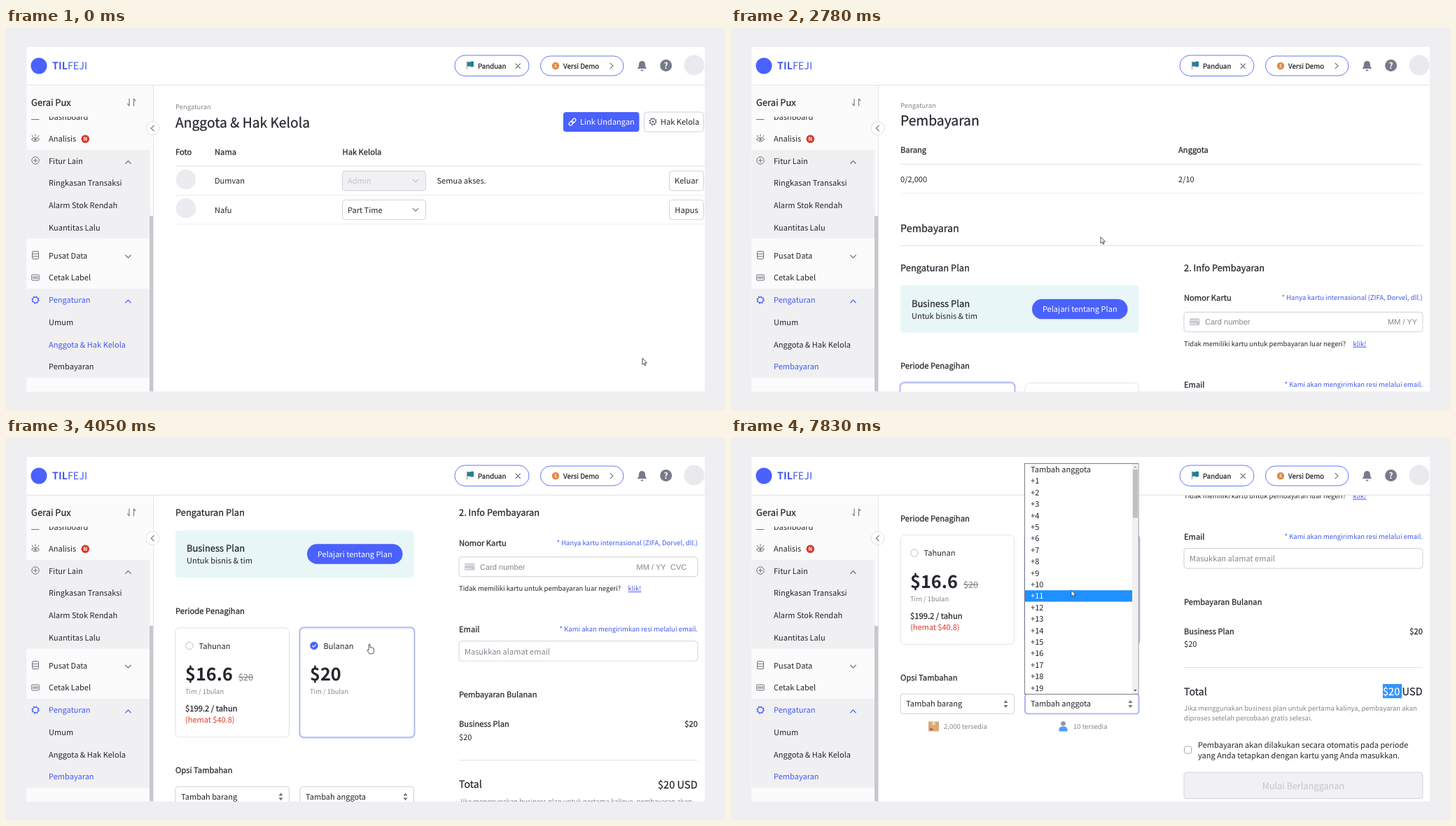
An HTML page for the animation above (8 s loop, 1027 by 545 pixels).

```html
<!DOCTYPE html>
<html lang="id">
<head>
<meta charset="utf-8">
<title>Pengaturan</title>
<style>
html, body { margin: 0; height: 100%; overflow: hidden; background: #efeff2; }
svg { display: block; width: 1027px; height: 545px; }
text {
  font-family: "Noto Sans CJK KR", "Noto Sans CJK JP", "Noto Sans CJK SC", "Noto Sans", sans-serif;
  fill: currentColor; color: #25262e; text-rendering: geometricPrecision; white-space: pre;
}
.m { stroke: currentColor; stroke-width: .25px; }
.bold { font-weight: 700; }
.arial { font-family: "Liberation Sans", Arial, sans-serif; }
.gray { color: #85868f; }
.pale { color: #c3c3ca; }
.blue { color: #4459f0; }
.red { color: #e2382c; }
.white { color: #fff; }
.end { text-anchor: end; }
.mid { text-anchor: middle; }
.under { text-decoration: underline; }
.strike { text-decoration: line-through; }
.line { fill: none; stroke: #70737f; stroke-width: 1.1; stroke-linecap: round; stroke-linejoin: round; }

/* one shared 8 s clock */
.k { animation: 8s step-end infinite; }
.members { animation-name: members; }
.was { animation-name: was; }
.now { animation-name: now; }
.loading { animation-name: loading; }
.bar { animation-name: bar; animation-timing-function: linear; }
.spin { animation-name: spin; animation-timing-function: linear; }
.billing { animation-name: billing; }
.scroll { animation-name: scroll; }
.yearly { animation-name: yearly; }
.monthly { animation-name: monthly; }
.expiry { animation-name: expiry; }
.cvc { animation-name: cvc; }
.picked { animation-name: picked; }
.open { animation-name: open; }
.row { animation-name: row; }
.cursor { animation-name: cursor; animation-timing-function: linear; }
.arrow { animation-name: arrow; }
.hand { animation-name: hand; }

@keyframes members { 0% { opacity: 1 } 19.875%, 100% { opacity: 0 } }
@keyframes was { 0% { color: #4459f0 } 19.875%, 100% { color: #25262e } }
@keyframes now { 0% { color: #25262e } 19.875%, 100% { color: #4459f0 } }
@keyframes loading { 0% { opacity: 0 } 19.875% { opacity: 1 } 28.4%, 100% { opacity: 0 } }
@keyframes bar { 0%, 19.875% { transform: translateX(-531px) } 24.5% { transform: translateX(155px) } 28.4%, 100% { transform: translateX(730px) } }
@keyframes spin { from { transform: rotate(14.4deg) } to { transform: rotate(2894.4deg) } }
@keyframes billing { 0% { opacity: 0 } 28.4%, 100% { opacity: 1 } }
@keyframes scroll {
  0%, 34.125% { transform: translateY(217px); animation-timing-function: cubic-bezier(.333, 0, .667, .333) }
  37.875% { transform: translateY(125.4px); animation-timing-function: cubic-bezier(.333, .667, .667, 1) }
  43.125%, 48.375% { transform: translateY(0); animation-timing-function: ease-in-out }
  57.125%, 100% { transform: translateY(-153.5px) }
}
@keyframes yearly { 0% { opacity: 1 } 48.375%, 100% { opacity: 0 } }
@keyframes monthly { 0% { opacity: 0 } 48.375%, 100% { opacity: 1 } }
@keyframes expiry { 0%, 41.25% { transform: none; animation-timing-function: ease-out } 43%, 100% { transform: translateX(-37.5px) } }
@keyframes cvc { 0% { opacity: 0 } 42.5%, 100% { opacity: 1 } }
@keyframes picked { 0%, 71.75% { width: 0; animation-timing-function: linear } 74.375%, 100% { width: 27.5px } }
@keyframes open { 0% { opacity: 0 } 84.5%, 100% { opacity: 1 } }
@keyframes row {
  0% { transform: translateY(0) }
  93.8% { transform: translateY(311.6px); animation-timing-function: steps(8) }
  97.41%, 100% { transform: translateY(180.4px) }
}
@keyframes cursor {
  0%, .625% { transform: translate(909px, 471px); animation-timing-function: ease-out }
  2.75%, 6% { transform: translate(548px, 344px); animation-timing-function: ease-in-out }
  15.5% { transform: translate(111px, 501px) }
  17.375%, 19.25% { transform: translate(105px, 476px) }
  24.5% { transform: translate(403px, 372px); animation-timing-function: cubic-bezier(.333, .667, .667, 1) }
  29.125%, 34.125% { transform: translate(528px, 297px) }
  37.875% { transform: translate(528px, 303px) }
  43.125%, 48.375% { transform: translate(523px, 300px); animation-timing-function: ease-in-out }
  57.125%, 61.5% { transform: translate(495px, 255px) }
  65.5% { transform: translate(887px, 363px); animation-timing-function: ease-out }
  71.125%, 71.75% { transform: translate(930px, 365px) }
  74.375%, 75% { transform: translate(958px, 366px) }
  80.125% { transform: translate(585px, 371.5px) }
  81.375% { transform: translate(527px, 374px); animation-timing-function: ease-out }
  83.75%, 93.5% { transform: translate(487px, 376px) }
  97.875%, 100% { transform: translate(486px, 217px) }
}
@keyframes arrow {
  0% { opacity: 1 } 12.875% { opacity: 0 } 20.5% { opacity: 1 } 37.375% { opacity: 0 }
  39.375% { opacity: 1 } 44.375% { opacity: 0 } 61.875%, 100% { opacity: 1 }
}
@keyframes hand {
  0% { opacity: 0 } 12.875% { opacity: 1 } 20.5% { opacity: 0 } 37.375% { opacity: 1 }
  39.375% { opacity: 0 } 44.375% { opacity: 1 } 61.875%, 100% { opacity: 0 }
}
</style>
</head>
<body>
<svg id="stage" viewBox="0 0 1027 545"></svg>
<script>
const BLUE = '#4a61fd', RING = '#a9b3f6', EDGE = '#d0d1d7', GRAY = '#70737f';

// y is the middle of the capitals
const t = (x, y, s, cls = '', size = cls.startsWith('m') ? 11.2 : 11.06) =>
  `<text x="${x}" y="${(y + size * .36).toFixed(2)}" font-size="${size}" class="${cls}">${s}</text>`;
const box = (x, y, w, h, fill = '#fff', edge = 'none', r = 4, sw = 1) =>
  `<rect x="${x}" y="${y}" width="${w}" height="${h}" rx="${r}" fill="${fill}" stroke="${edge}" stroke-width="${sw}"/>`;
const dot = (x, y, r, fill, edge = 'none') =>
  `<circle cx="${x}" cy="${y}" r="${r}" fill="${fill}" stroke="${edge}"/>`;
const path = (d, more = '') => `<path class="line" d="${d}" ${more}/>`;
const rule = (x1, x2, y, c = '#e3e3e8') => `<path d="M${x1} ${y}H${x2}" stroke="${c}"/>`;
const chev = (x, y, deg = 0, c = GRAY) =>
  path('M-3.8-2L0 2L3.8-2', `transform="translate(${x} ${y}) rotate(${deg})" style="stroke:${c}"`);
const anim = (name, s) => `<g class="k ${name}">${s}</g>`;
const gear = (x, y, c) => `<g fill="none" stroke="${c}">
  <circle cx="${x}" cy="${y}" r="3.9" stroke-width="1.2"/>
  <circle cx="${x}" cy="${y}" r="4.9" stroke-width="1.5" stroke-dasharray="1.92"/></g>`;

function header() {
  return rule(30, 998, 81.5) + dot(47, 54, 11.5, BLUE) +
    `<text x="66" y="59" font-size="14.3" class="blue"><tspan class="bold">TIL</tspan>FEJI</text>` +
    box(641, 39, 106, 29.5, '#fff', '#6778f3', 14.7) +
    `<path d="M659 48q2.3 1 4.5 0t4.5 0v7q-2.3 1-4.5 0t-4.5 0z" fill="#237f97"/>` +
    path('M658.5 48v10.5', 'style="stroke:#9aa0aa"') +
    t(674, 54, 'Panduan', 'm', 9.75) + path('M728 51l6.500 6.500M734.500 51l-6.500 6.500') +
    box(763.5, 40, 118.5, 28, '#fff', '#6778f3', 14) + dot(785, 54, 5.2, '#e08a48') +
    t(785, 54, '1', 'mid white bold', 6.5) + t(796, 54, 'Versi Demo', 'm', 9.8) + chev(865, 54, -90) +
    `<path d="M901.500 58q2.500-2 2.500-6.500a4.500 4.500 0 0 1 9 0q0 4.500 2.500 6.500zM906.500 59.500h4a2 2 0 0 1-4 0z" fill="#777b87"/>` +
    dot(942.7, 53.6, 8.5, '#777b87') + t(942.7, 53.6, '?', 'mid white bold', 12) +
    dot(983, 53, 14.5, '#eaeaee');
}

function sidebar() {
  const items = [[127, 'Dashboard'], [158, 'Analisis'], [190, 'Fitur Lain'], [221.5, 'Ringkasan Transaksi'],
    [253.5, 'Alarm Stok Rendah'], [285, 'Kuantitas Lalu'], [325, 'Pusat Data'], [356.5, 'Cetak Label'],
    [388, 'Pengaturan', 'blue'], [420, 'Umum'], [452, 'Anggota &amp; Hak Kelola', 'k was'], [483.5, 'Pembayaran', 'k now']];
  return box(29.5, 82, 181, 436.5, '#fbfbfc', 'none', 0) +
    box(29.5, 174, 176, 126.5, '#f0f0f3', 'none', 0) + box(29.5, 372, 176, 127, '#f0f0f3', 'none', 0) +
    `<path d="M210.500 82V518.500" stroke="#e6e6ea"/>` + box(205, 268, 5, 250.5, '#c8c8cd', 'none', 0) +
    t(36, 106, 'Gerai Pux', 'm', 12.9) + path('M176 101v10l-2.500-2.800M182.500 111v-10l2.500 2.800') +
    `<g clip-path="url(#list)">${items.map(([y, s, c]) => t(61, y, s, c)).join('')}</g>` +
    path('M36.500 130.500H47') +
    path('M36.500 159q5.500-6 11 0q-5.500 6-11 0zM38.300 155l-1-1.500M42 153.600v-1.800M45.700 155l1-1.500') + dot(42, 159, 1.7, GRAY) +
    dot(113.3, 158.3, 5.8, '#d8382d') + t(113.3, 158.3, 'N', 'mid white bold', 7.5) +
    dot(42, 189, 5.2, 'none', GRAY) + path('M39.500 189h5M42 186.500v5') + chev(174.5, 191.5, 180) +
    box(37.5, 318.5, 9, 11, 'none', GRAY, 1.5) + path('M37.500 322.300h9M37.500 325.800h9') + chev(174.5, 326) +
    box(36.7, 352, 10.6, 8, 'none', GRAY, 1) + path('M39 354.500v3M41 354.500v3M43 354.500v3M45 354.500v3') +
    gear(42, 388, BLUE) + chev(174.5, 390, 180, BLUE) +
    dot(209.5, 143, 9.5, '#fff', '#e0e0e5') + chev(209.3, 143, 90);
}

function members() {
  const row = (y, name, role, act, off) =>
    dot(257, y - 2, 14.2, '#ececf0') + t(298, y + .5, name) +
    box(480.5, y - 14, 119, 28, off ? '#f1f1f4' : '#fff', EDGE) + t(488, y + .3, role, off ? 'pale' : '') +
    chev(585, y, 0, off ? '#c3c3ca' : GRAY) +
    box(947.5, y - 14, 49, 28, '#fff', EDGE) + t(972, y + .3, act, 'mid') + rule(242, 998, y + 20.5, '#eeeef1');
  return t(242, 113, 'Pengaturan', 'gray', 9.45) + t(242, 135, 'Anggota &amp; Hak Kelola', 'm', 19.3) +
    box(796, 120, 108.5, 28, BLUE) + t(820, 134, 'Link Undangan', 'white') +
    `<g transform="translate(809 134) rotate(-45)" fill="none" stroke="#fff" stroke-width="1.200">
      <rect x="-6" y="-2.200" width="7" height="4.400" rx="2.200"/><rect x="-1" y="-2.200" width="7" height="4.400" rx="2.200"/></g>` +
    box(911.5, 120, 85, 28, '#fff', EDGE) + gear(924, 133.5, GRAY) + dot(924, 133.5, 1.6, GRAY) + t(935, 134, 'Hak Kelola') +
    t(242, 177, 'Foto', 'm') + t(298, 177, 'Nama', 'm') + t(480.5, 177, 'Hak Kelola', 'm') + rule(242, 998, 197) +
    row(218, 'Dumvan', 'Admin', 'Keluar', true) + t(615.5, 218.5, 'Semua akses.') +
    row(259.3, 'Nafu', 'Part Time', 'Hapus');
}

const loader = () =>
  `<rect class="k bar" y="80.500" width="560" height="1.500" fill="#7f90f8"/>
   <g transform="translate(619 310)"><path class="k spin" d="M11.900 10.700A16 16 0 1 1 4.940-15.200"
     fill="none" stroke="#878da3" stroke-width="2.400" stroke-linecap="round"/></g>`;

const card = (x, on) =>
  (on ? box(x - .5, 291.5, 164, 157, '#fff', RING, 6, 1.8) : box(x, 292, 162.5, 156, '#fff', '#e0e1e6', 6)) +
  (on ? dot(x + 20, 317.5, 5.7, BLUE) + path(`M${x + 17.5} 317.600l1.800 1.800l3.300-3.600`, 'style="stroke:#fff"')
      : dot(x + 20, 317.5, 5.2, '#fff', '#bbbcc4'));

function picker(x, label, focus) {
  const a = x + 150.5;
  return box(x, 518.5, 162.5, 28.5, '#fff', focus ? RING : EDGE, 4, focus ? 2 : 1) + t(x + 8, 533, label) +
    `<path d="M${a - 3} 531.500l3-4l3 4zM${a - 3} 534.500l3 4l3-4z" fill="${GRAY}"/>`;
}

function billing() {
  const plan = (title, price, detail) => t(647, 387.5, title, 'm') + t(647, 429, 'Business Plan', 'm') +
    t(988, 429, price, 'm end') + t(647, 448, detail);
  return t(242, -104, 'Pengaturan', 'gray', 9.45) + t(242, -82, 'Pembayaran', 'm', 19.3) +
    t(242, -40, 'Barang', 'm') + t(639, -40, 'Anggota', 'm') + rule(242, 988, -20) +
    t(242, 1.3, '0/2,000') + t(639, 1.3, '2/10') + rule(242, 988, 21.5, '#eeeef1') +
    t(242, 71, 'Pembayaran', 'm', 14.35) + rule(242, 988, 96.2) +
    t(242, 128, 'Pengaturan Plan', 'm', 12.85) + t(647, 128, '2. Info Pembayaran', 'm', 12.87) +
    // left column
    box(242, 153, 340.5, 67.5, '#e8f6f8') + t(258, 178.5, 'Business Plan', 'm', 12.95) + t(258, 196.5, 'Untuk bisnis &amp; tim') +
    box(430, 172.5, 136.5, 28.5, BLUE, 'none', 14.2) + t(498.3, 187, 'Pelajari tentang Plan', 'white mid') +
    t(242, 268, 'Periode Penagihan', 'm', 11.27) +
    anim('yearly', card(242, true) + card(420, false)) + anim('monthly', card(242, false) + card(420, true)) +
    t(275.5, 318, 'Tahunan') + t(453.5, 318, 'Bulanan') +
    t(256, 358.5, '$16.6', 'bold', 25.3) + t(434, 358.5, '$20', 'bold', 25.3) + t(332, 363, '$20', 'gray strike', 12.7) +
    t(256, 383, 'Tim / 1bulan', 'gray', 9.4) + t(434, 383, 'Tim / 1bulan', 'gray', 9.4) +
    t(256, 407.5, '$199.2 / tahun', 'm', 11.25) + t(256, 423.5, '(hemat $40.8)', 'red', 11) +
    t(242, 495.5, 'Opsi Tambahan', 'm') + picker(242, 'Tambah barang') + picker(420, 'Tambah anggota') +
    anim('open', picker(420, 'Tambah anggota', true)) +
    box(282, 558, 15, 14, '#dba878', 'none', 1) + box(287.5, 558, 4, 5, '#f0d9b8', 'none', 0) + box(284, 568, 4, 2, '#7a5a3c', 'none', 0) +
    t(304, 565, '2,000 tersedia', 'gray', 9.5) +
    dot(474.5, 561, 3.3, '#8d97a8') + `<path d="M468.500 572v-2.500q0-4.500 6-4.500t6 4.500v2.500z" fill="#4f9ff8"/>` +
    t(489, 565, '10 tersedia', 'gray', 9.5) +
    // right column
    t(647, 171, 'Nomor Kartu', 'm') + t(988, 170.5, '* Hanya kartu internasional (ZIFA, Dorvel, dll.)', 'blue end', 9.5) +
    box(647, 191, 341, 28, '#fff', EDGE) + box(655, 200, 14.5, 10, '#c9cad1', 'none', 1.5) +
    path('M656.500 207.500h3.500M662 207.500h2', 'style="stroke:#fff"') + box(655, 202, 14.5, 1.5, '#e6e6ea', 'none', 0) +
    t(677, 205, 'Card number', 'arial gray') +
    anim('expiry', t(938, 205, 'MM / YY', 'arial gray')) + anim('cvc', t(949, 205, 'CVC', 'arial gray')) +
    t(647, 236, 'Tidak memiliki kartu untuk pembayaran luar negeri?', '', 9.5) + t(888.5, 236, 'klik!', 'blue under', 9.5) +
    t(647, 294.5, 'Email', 'm') + t(988, 294, '* Kami akan mengirimkan resi melalui email.', 'blue end', 9.5) +
    box(647, 311, 341, 28.5, '#fff', EDGE) + t(655, 326, 'Masukkan alamat email', 'gray') +
    anim('yearly', plan('Pembayaran Tahunan', '$240', '$20 x 12 bulan') +
      t(647, 482.5, 'Diskon', 'red') + t(988, 482.5, '-$40.8', 'red end') + t(647, 501.5, 'Promosi tahunan')) +
    anim('monthly', plan('Pembayaran Bulanan', '$20', '$20') + rule(647, 988, 481) +
      t(647, 515.5, 'Total', 'm', 14.2) + t(931, 515.5, '$20 USD', 'm', 14.6) +
      `<g clip-path="url(#picked)">${box(931, 504.5, 27.5, 20.5, '#3295fb', 'none', 0)}${t(931, 515.5, '$20', 'm white', 14.6)}</g>` +
      t(647, 539.5, 'Jika menggunakan business plan untuk pertama kalinya, pembayaran akan', 'gray', 9.5) +
      t(647, 553, 'diproses setelah percobaan gratis selesai.', 'gray', 9.5) +
      box(647.5, 593.5, 10, 10, '#fff', '#a9aab3', 2) +
      t(667, 591.5, 'Pembayaran akan dilakukan secara otomatis pada periode') +
      t(667, 607, 'yang Anda tetapkan dengan kartu yang Anda masukkan.') +
      box(647, 630.5, 341, 37.5, '#f1f1f4', '#d5d5db') + t(817.5, 650, 'Mulai Berlangganan', 'pale mid', 12.7));
}

function dropdown() {
  const list = cls => Array.from({ length: 20 }, (_, i) =>
    t(428, 45 + i * 16.4, i ? '+' + i : 'Tambah anggota', cls)).join('');
  return box(419.5, 36.5, 162.5, 329, '#fff', '#7d7e86', 0) + list('') +
    `<g clip-path="url(#row)">${box(420, 36.5, 153, 329, '#1e90ff', 'none', 0)}${list('white')}</g>` +
    box(573, 37, 8.5, 328, '#f1f1f1', 'none', 0) + box(574, 45, 7, 69, '#c1c1c1', 'none', 0) +
    `<path d="M575.200 42.500l2.200-2.500l2.200 2.500z" fill="#a3a3a3"/><path d="M575.200 359l2.200 2.500l2.200-2.500z" fill="#505050"/>`;
}

const pointer = () => `<g class="k cursor" fill="#fff" stroke="#3a3b42" stroke-width=".9" stroke-linejoin="round">
  <path class="k arrow" d="M0 0v9.200l2.100-1.900 1.400 3.300 1.500-.7-1.400-3.100h2.900z"/>
  <path class="k hand" d="M-1 .8q1-1.400 2 0v4.400q1-.8 2 .2q1-.6 1.800.4q1.400-.4 1.500 1v3q0 2-1 4h-5.500q-1.300-2.200-3.400-4.600q.6-1.600 2.100-.2l.5.400z"/></g>`;

document.getElementById('stage').innerHTML = `<defs>
  <clipPath id="app"><rect x="29.500" y="27" width="968.500" height="491.500"/></clipPath>
  <clipPath id="main"><rect x="211" y="82" width="787" height="436.500"/></clipPath>
  <clipPath id="list"><rect x="30" y="126.500" width="176" height="392"/></clipPath>
  <clipPath id="picked"><rect class="k picked" x="931" y="504.500" width="0" height="20.500"/></clipPath>
  <clipPath id="row"><rect class="k row" x="420" y="36.800" width="153" height="16.400"/></clipPath></defs>` +
  box(29.5, 27, 968.5, 491.5, '#fff', 'none', 0) +
  `<g clip-path="url(#main)">${anim('members', members()) + anim('billing', anim('scroll', billing()))}</g>` +
  `<g clip-path="url(#app)">${header() + sidebar() + anim('loading', loader())}</g>` +
  anim('open', dropdown()) + pointer();
</script>
</body>
</html>
```
